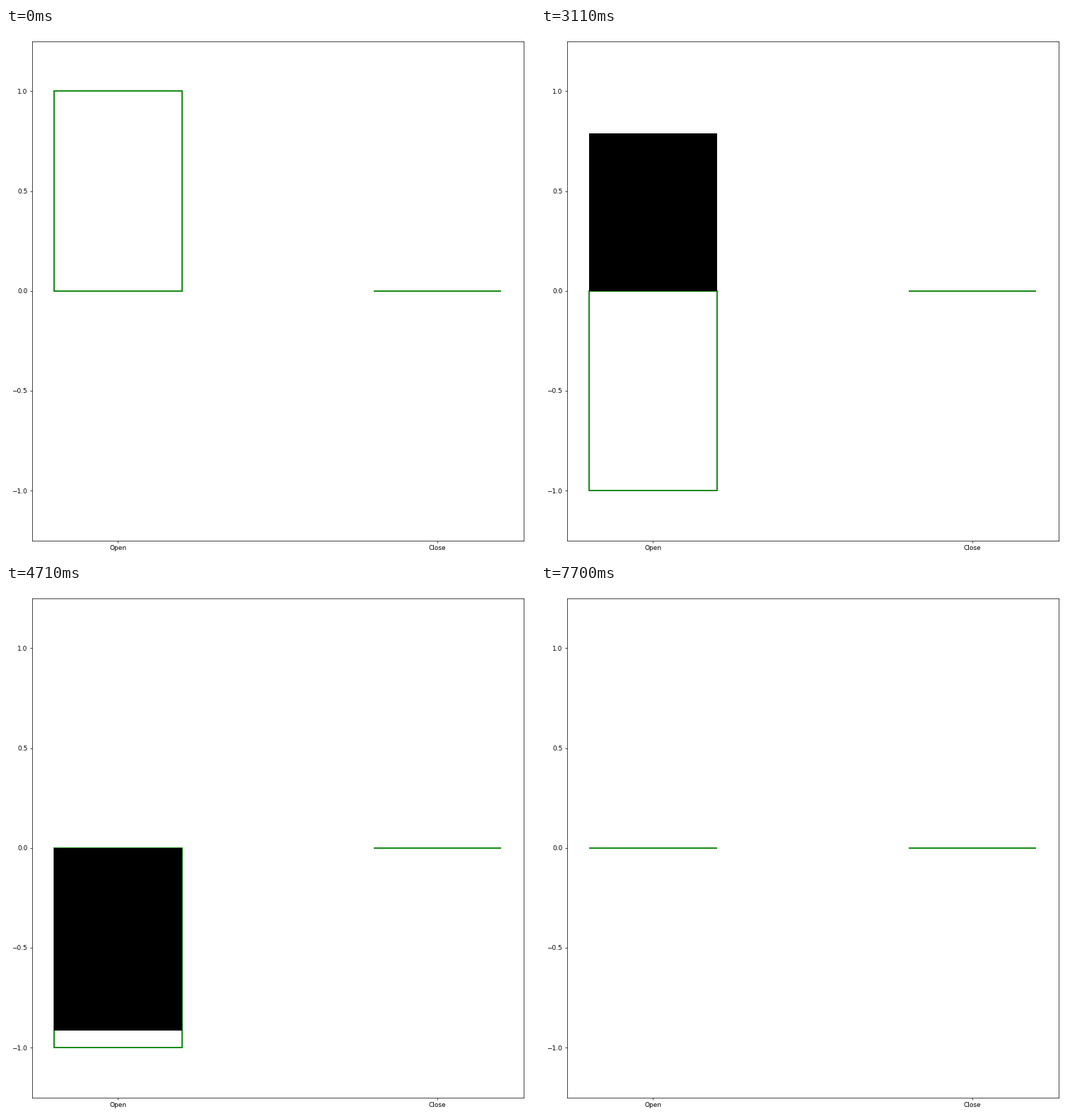
Recreate the animation shown at these times as a matplotlib script. Size 748 px wide and 748 px high, loop 7740 ms.

```python
import matplotlib.pyplot as plt
from matplotlib.animation import FuncAnimation

SIZE, DPI = 748, 65
LOOP, TICK = 7740, 20
STEP = 40                       # ms between two bar positions
LEFT, RIGHT, TOP, BOTTOM = 36.6, 731.8, 18.8, 724.8

# start of the move, start level, end level, number of steps
MOVES = [(0, 0, 1, 23), (2910, 1, -1, 47), (6780, -1, 0, 23)]
# start of the countdown, moment it reaches 0, end
PAUSES = [(960, 1900, 2630), (4830, 5770, 6500)]

plt.rcParams["font.family"] = "DejaVu Sans"
fig = plt.figure(figsize=(SIZE / DPI, SIZE / DPI), dpi=DPI, facecolor="white")
ax = fig.add_axes([LEFT / SIZE, 1 - BOTTOM / SIZE,
                   (RIGHT - LEFT) / SIZE, (BOTTOM - TOP) / SIZE])
names = ["Open", "Close"]
goals = ax.bar(names, [1, 0], width=0.4, fill=False, edgecolor="green", linewidth=2)
bars = ax.bar(names, [0, 0], width=0.4, color="black", linewidth=0)
labels = [ax.text(x, 0.05, "", color="red", weight="bold", size=10,
                  ha="center", va="center") for x in range(2)]
ax.set_xlim(-0.27, 1.27)
ax.set_ylim(-1.25, 1.25)
ax.set_yticks([-1, -0.5, 0, 0.5, 1])


def level(t):
    """Height of the filled bar at t ms."""
    start, a, b, steps = [m for m in MOVES if m[0] <= t][-1]
    n = min((t - start) // STEP, steps)
    return a + (b - a) * n / steps


def goal(t):
    """Height of the outlined bar at t ms."""
    if t < PAUSES[0][0]:
        return 1
    return -1 if t < PAUSES[1][0] else 0


def count(t):
    for start, zero, end in PAUSES:
        if start <= t < end:
            return "1" if t < zero else "0"
    return ""


def update(i):
    t = i * TICK + TICK // 2
    h = level(t)
    bars[0].set_height(h)
    goals[0].set_height(goal(t))
    labels[0].set_y(h + (0.05 if h >= 0 else -0.05))
    for label in labels:
        label.set_text(count(t))
    return [*bars, *goals, *labels]


anim = FuncAnimation(fig, update, frames=LOOP // TICK, interval=TICK,
                     repeat=True, repeat_delay=0, blit=False)
plt.show()
```
